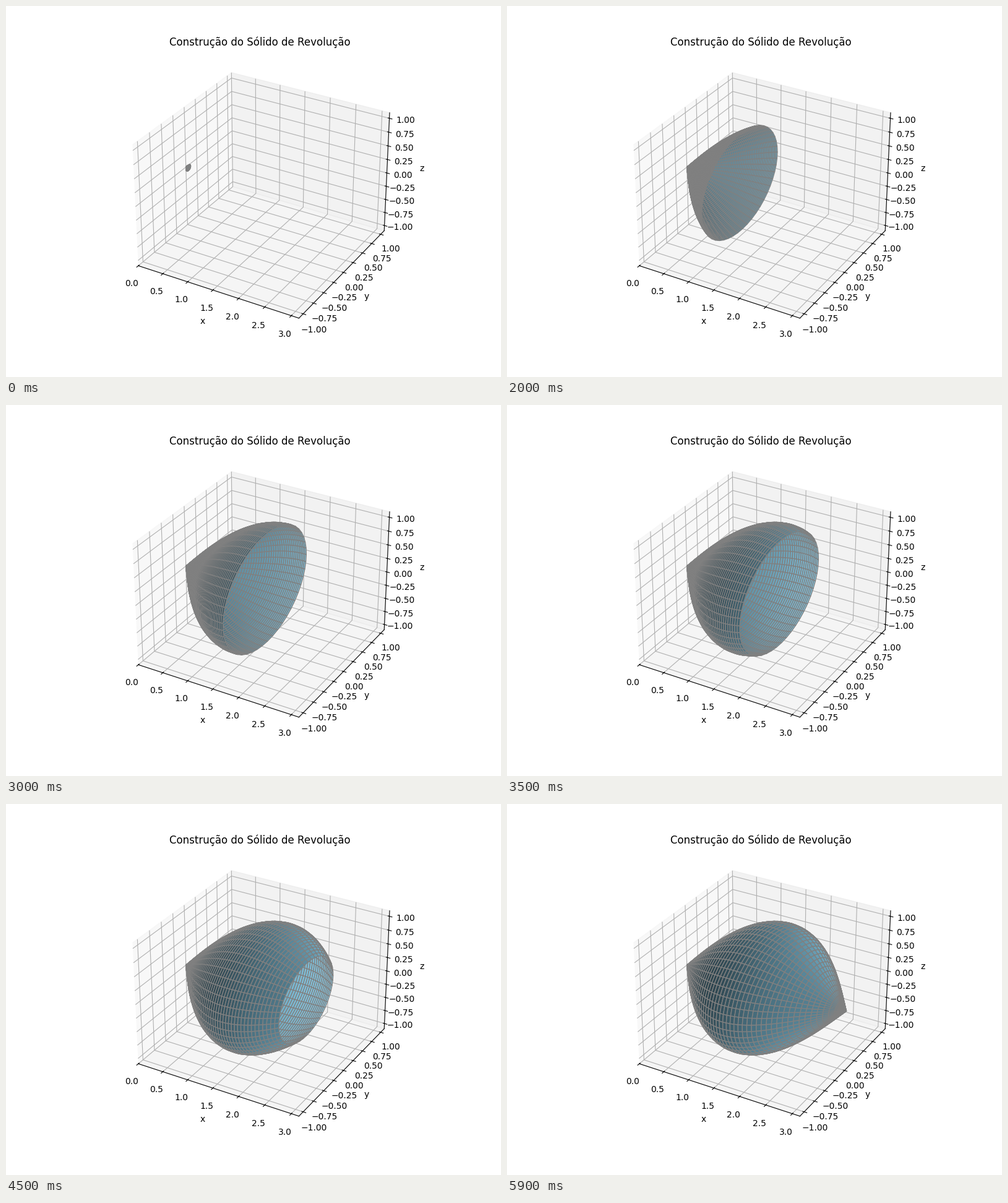
Animation of 800 by 600 pixels, one loop 6000 ms. Source, as a matplotlib script:

```python
import numpy as np
import matplotlib.pyplot as plt
from matplotlib.animation import FuncAnimation

FRAMES = 60
SAMPLES = 50

fig = plt.figure(figsize=(8, 6), dpi=100)
ax = fig.add_subplot(projection="3d")
ax.set(xlim=(0, np.pi), ylim=(-1.1, 1.1), zlim=(-1.1, 1.1),
       xlabel="x", ylabel="y", zlabel="z")
ax.set_title("Construção do Sólido de Revolução")

theta = np.linspace(0, 2 * np.pi, SAMPLES)
surface = None


def draw(frame):
    """Revolve sin(x) around the x axis, up to a growing end point."""
    global surface
    if surface is not None:
        surface.remove()
    end = np.pi * (frame + 1) / FRAMES
    x, t = np.meshgrid(np.linspace(0, end, SAMPLES), theta)
    r = np.sin(x)
    surface = ax.plot_surface(x, r * np.cos(t), r * np.sin(t),
                              color="skyblue", edgecolor="gray")
    # plotting may widen the limits
    ax.set(xlim=(0, np.pi), ylim=(-1.1, 1.1), zlim=(-1.1, 1.1))
    return [surface]


anim = FuncAnimation(fig, draw, frames=FRAMES, init_func=lambda: [],
                     interval=100, repeat=True, repeat_delay=0)
plt.show()
```
